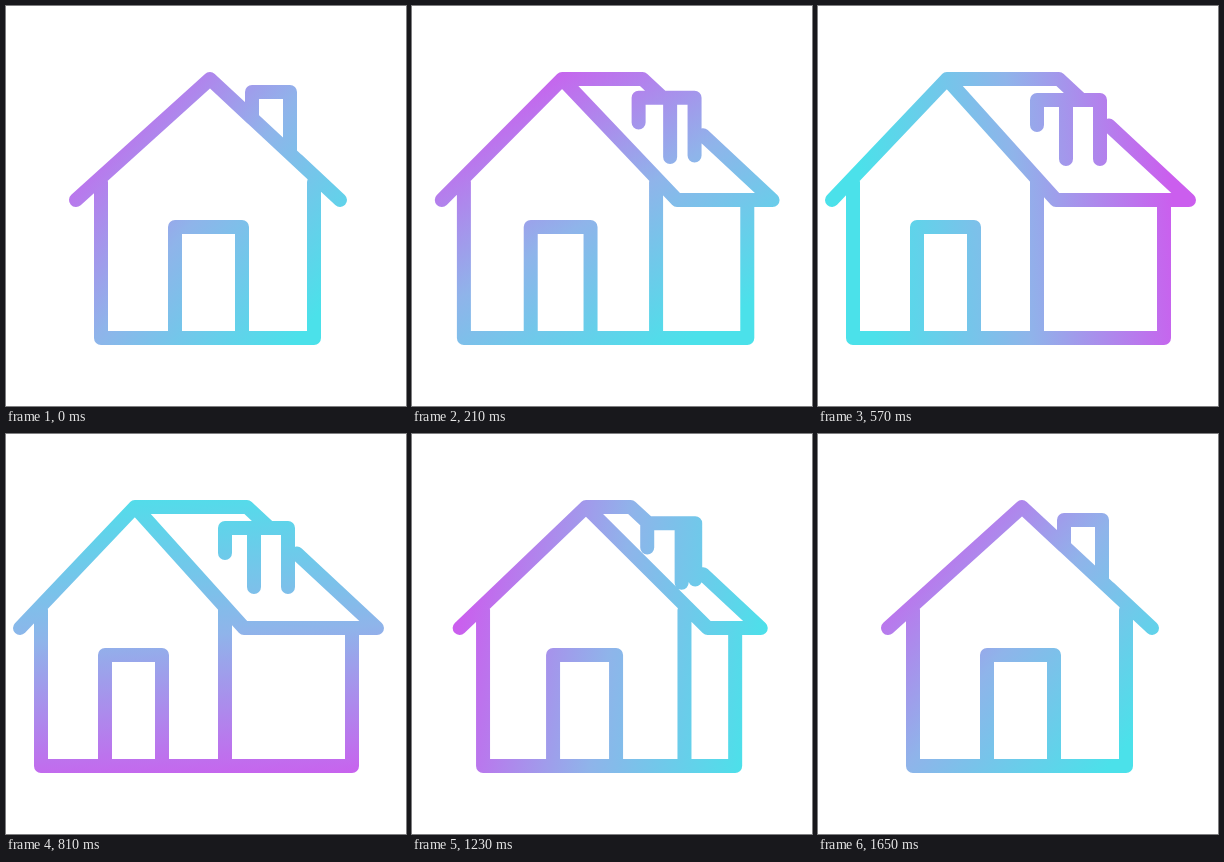
An HTML page that plays this animation: 400 by 400 pixels, repeating every 1680 ms.

```html
<!DOCTYPE html>
<html lang="en">
<head>
<meta charset="utf-8">
<title>House</title>
<style>
  html, body { margin: 0; width: 100%; height: 100%; overflow: hidden; background: #fff; }
  svg { display: block; width: 100%; height: 100%; }
</style>
</head>
<body>
<svg viewBox="0 0 400 400">
  <defs>
    <linearGradient id="tint" gradientUnits="userSpaceOnUse" x1="45" y1="200" x2="355" y2="200">
      <stop offset="0" stop-color="#cb5eee"/>
      <stop offset=".5" stop-color="#8fb4ea"/>
      <stop offset="1" stop-color="#4be1ea"/>
    </linearGradient>
  </defs>
  <path id="house" fill="none" stroke="url(#tint)" stroke-width="14"
        stroke-linecap="round" stroke-linejoin="round"/>
</svg>
<script>
const LOOP = 1680, STEP = 30;
const EAVE = 194, RIDGE = 73, FLOOR = 332, WALL_TOP = 176, DOOR_TOP = 221;
const house = document.getElementById('house');
const tint = document.getElementById('tint');

// Cubic Bezier easing with control points (x1, 0) and (x2, 1)
const ease = (x1, x2) => u => {
  if (u <= 0) return 0;
  if (u >= 1) return 1;
  let lo = 0, hi = 1;
  for (let i = 0; i < 30; i++) {
    const s = (lo + hi) / 2, r = 1 - s;
    if (3 * x1 * s * r * r + 3 * x2 * s * s * r + s ** 3 < u) lo = s; else hi = s;
  }
  return lo * lo * (3 - 2 * lo);
};
const open = ease(.33, .15), close = ease(.5, .5), spin = ease(.33, .42);

const line = (...points) => 'M' + points.map(p => p.map(n => n.toFixed(2)).join(' ')).join('L');

// p: 0 is the flat front view, 1 is the house turned to show its side
function outline(p) {
  const at = (from, to) => from + (to - from) * p;
  const apex = at(204, 129), ridgeEnd = at(204, 241);
  const eaveLeft = at(70, 14), eaveFront = at(334, 238), eaveBack = at(334, 371);
  const wallLeft = at(95, 35), wallFront = at(308, 219), wallBack = at(308, 346);
  const doorLeft = at(169, 99), doorRight = at(236, 156);
  const stackLeft = at(246, 219), stackMid = at(284, 248), stackRight = at(284, 282);
  const stackTop = at(86, 94);

  const slope = (EAVE - RIDGE) / (eaveBack - ridgeEnd);
  const onSlope = x => [x, RIDGE + (x - ridgeEnd) * slope];
  const roofBreak = Math.max(ridgeEnd + (stackTop - RIDGE) / slope, stackLeft);

  return [
    line([eaveLeft, EAVE], [apex, RIDGE], [eaveFront, EAVE], [eaveBack, EAVE], onSlope(291)),
    line([apex, RIDGE], [ridgeEnd, RIDGE], onSlope(roofBreak)),
    line([wallLeft, WALL_TOP], [wallLeft, FLOOR], [wallBack, FLOOR], [wallBack, EAVE]),
    line([wallFront, WALL_TOP], [wallFront, FLOOR]),
    line([doorLeft, FLOOR], [doorLeft, DOOR_TOP], [doorRight, DOOR_TOP], [doorRight, FLOOR]),
    line([stackLeft, at(110, 119)], [stackLeft, stackTop], [stackRight, stackTop],
         [stackRight, at(140.5, 153)]),
    line([stackMid, stackTop], [stackMid, at(146, 153)])
  ].join('');
}

function draw(now) {
  const t = Math.floor(now % LOOP / STEP) * STEP;
  const turn = open(t / 500) - close((t - 825) / 735);
  house.setAttribute('d', outline(turn));
  tint.setAttribute('gradientTransform', `rotate(${40 + 360 * spin(t / LOOP)} 200 200)`);
}

const start = performance.now();
function tick() {
  draw(performance.now() - start);
  requestAnimationFrame(tick);
}
tick();
</script>
</body>
</html>
```
